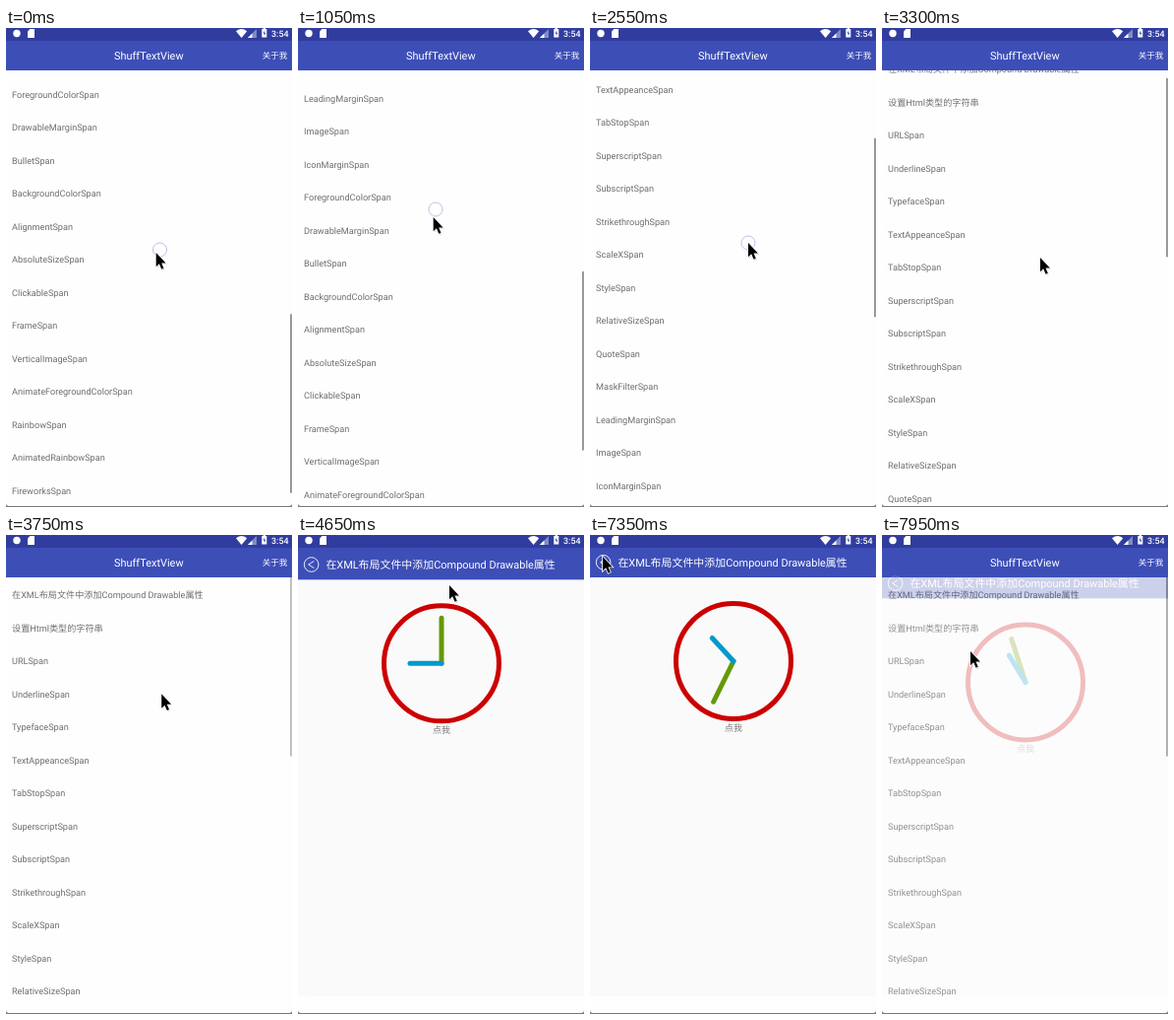
Write an HTML page that moves like this. It is 291 by 486 pixels and loops after 8 s.

```html
<!DOCTYPE html>
<html lang="zh">
<head>
<meta charset="utf-8">
<title>ShuffTextView</title>
<style>
  html, body { margin: 0; width: 100%; height: 100%; overflow: hidden; }
  svg { display: block; width: 100%; height: 100%; }
  text { font-family: Roboto, "Noto Sans CJK SC", "Noto Sans CJK", sans-serif; text-rendering: geometricPrecision; }
  #list { font-size: 9.15px; fill: #6e6e6e; }
  .title { font-size: 10.95px; fill: #fff; }
  .bar { fill: #3d4eb7; }
</style>
</head>
<body>
<svg viewBox="0 0 291 486" preserveAspectRatio="none">
  <defs>
    <clipPath id="content"><rect y="13" width="291" height="455"/></clipPath>
    <clipPath id="window"><path d="M0 0H291V482Q291 485 288 485H3Q0 485 0 482Z"/></clipPath>
  </defs>
  <rect width="291" height="486" fill="#77777b"/>
  <g clip-path="url(#window)">
    <rect width="291" height="486" fill="#fefefe"/>
    <g id="list"></g>
    <rect id="thumb" x="289" width="2" height="181.5" fill="#999"/>
    <rect class="bar" y="13" width="291" height="30"/>
    <text class="title" x="110" y="32">ShuffTextView</text>
    <text x="260.8" y="31.2" font-size="8.5" fill="#fff">关于我</text>
  </g>

  <g clip-path="url(#content)">
    <g id="page">
      <rect y="43" width="291" height="430" fill="#fafafa"/>
      <rect class="bar" y="13" width="291" height="30"/>
      <g fill="none" stroke="#fff" stroke-width="0.9">
        <circle cx="13.6" cy="27.7" r="7.3"/>
        <path d="M16.3 24.2L10.6 27.7L16.3 31.2"/>
      </g>
      <text class="title" x="28.4" y="32">在XML布局文件中添加Compound Drawable属性</text>
      <g fill="none" stroke-width="5" stroke-linecap="round">
        <circle cx="146" cy="128" r="58.5" stroke="#c00"/>
        <path id="minute" d="M146 128V82" stroke="#690"/>
        <path id="hour" d="M146 128V96" stroke="#09c"/>
      </g>
      <text x="146" y="198.6" font-size="9" fill="#777" text-anchor="middle">点我</text>
    </g>
  </g>

  <rect width="291" height="13" fill="#303d9f"/>
  <g fill="#fff">
    <circle cx="11" cy="5.5" r="3.7"/>
    <path d="M24.4 1H29V10H22V3.6Z"/>
    <path d="M234 3.2Q239.6 -1 245.2 3.2L239.6 10Z"/>
    <path d="M255 1V10H246Z" opacity=".4"/>
    <path d="M250.5 5.5V10H246Z"/>
    <path d="M261.7 0H264V1H265.3V9.5H260.3V1H261.7Z"/>
    <text x="270" y="9" font-size="8.9" font-weight="500">3:54</text>
  </g>
  <path d="M263.2 2.6L261.6 5.6H262.8V8L264.2 4.9H263.1Z" fill="#303d9f"/>

  <circle id="touch" r="7" fill="#fff" fill-opacity=".5" stroke="#c2bfe8"/>
  <g id="cursor">
    <path d="M1 1.2V15.5L4.2 12.5L6.6 18L8.8 17L6.5 11.7H11Z" fill="#000" opacity=".2"/>
    <path d="M0 0V14.3L3.2 11.3L5.6 16.7L7.8 15.7L5.5 10.5H9.9Z" stroke="#fff" stroke-width="1.6" paint-order="stroke"/>
  </g>
</svg>
<script>
const LOOP = 8000, STEP = 150, ROW = 33.5, TOP = 61;
const OPEN = 4500, CLOCK = 5316, CLOSE = 7800, SLIDE = 38;
const spans = ('URL Underline Typeface TextAppeance TabStop Superscript Subscript Strikethrough ScaleX Style ' +
  'RelativeSize Quote MaskFilter LeadingMargin Image IconMargin ForegroundColor DrawableMargin Bullet ' +
  'BackgroundColor Alignment AbsoluteSize Clickable Frame VerticalImage AnimateForegroundColor Rainbow ' +
  'AnimatedRainbow Fireworks').split(' ').map(s => s + 'Span');
const items = ['在XML布局文件中添加Compound Drawable属性', '设置Html类型的字符串', ...spans];

// Each drag: start, end, distance scrolled
const drags = [[0, 725, 104.5], [1050, 2550, 326], [2550, 3500, 166]];
// Each press: time and place of the finger
const presses = [[0, 156.5, 225], [1050, 140, 184], [2550, 161, 218], [5250, 90, 104]];
// Cursor stops: time and place
const stops = [[0, 152.7, 228], [500, 146, 275], [1050, 137.7, 192], [1500, 146, 285], [2550, 161, 218],
  [2850, 163, 285], [3300, 161, 233], [4350, 154, 51], [4950, 154, 51], [5250, 91, 107],
  [6450, 91, 107], [7050, 12, 46], [7350, 13, 22], [7950, 90, 118]];

const $ = id => document.getElementById(id);
const clamp = v => Math.min(1, Math.max(0, v));
const progress = (t, from, length) => clamp((t - from) / length);
const smooth = x => x * x * (3 - 2 * x);
const move = (id, x, y) => $(id).setAttribute('transform', `translate(${x} ${y})`);
const turn = (id, deg) => $(id).setAttribute('transform', `rotate(${deg} 146 128)`);
const fade = (id, v) => $(id).setAttribute('opacity', v);

items.forEach((name, i) => {
  const row = document.createElementNS('http://www.w3.org/2000/svg', 'text');
  row.setAttribute('x', 6);
  row.setAttribute('y', TOP + 3.3 + ROW * i);
  row.textContent = name;
  $('list').append(row);
});

function cursorAt(t) {
  const n = stops.findLastIndex(s => s[0] <= t);
  const [t0, x0, y0] = stops[n], [t1, x1, y1] = stops[n + 1] || [LOOP, x0, y0];
  const f = smooth(progress(t, t0, t1 - t0));
  return [x0 + (x1 - x0) * f, y0 + (y1 - y0) * f];
}

function drawList(t) {
  let scroll = 0, idle = LOOP;
  for (const [start, end, distance] of drags) {
    scroll += distance * (1 - smooth(progress(t, start, end - start)));
    if (t >= start) idle = t - end;
  }
  move('list', 0, -scroll);
  $('thumb').setAttribute('y', 43 + scroll * .4146);
  fade('thumb', t > CLOSE ? 1 : clamp(1 - (idle - 150) / 250));
}

function drawPage(t) {
  const enter = progress(t, OPEN, 350), leave = progress(t, CLOSE, 200);
  move('page', 0, SLIDE * ((1 - enter) ** 5 + leave ** 2));
  fade('page', 1 - (1 - progress(t, OPEN, 200)) ** 4 - leave);

  // Two hours pass with an accelerate-decelerate curve
  const hours = 1 - Math.cos(Math.PI * progress(t, CLOCK, 2930));
  turn('minute', 360 * hours);
  turn('hour', 270 + 30 * hours);
}

function drawPointer(t) {
  const [x, y] = cursorAt(t);
  move('cursor', x, y);
  const press = presses.find(([start]) => t >= start && t < start + 450);
  fade('touch', press ? 1 : 0);
  if (!press) return;
  const [x0, y0] = cursorAt(press[0]);
  move('touch', press[1] + x - x0, press[2] + y - y0);
}

const begin = performance.now();
function tick() {
  const t = Math.floor((performance.now() - begin) % LOOP / STEP) * STEP;
  drawList(t);
  drawPage(t);
  drawPointer(t);
  requestAnimationFrame(tick);
}
tick();
</script>
</body>
</html>
```
